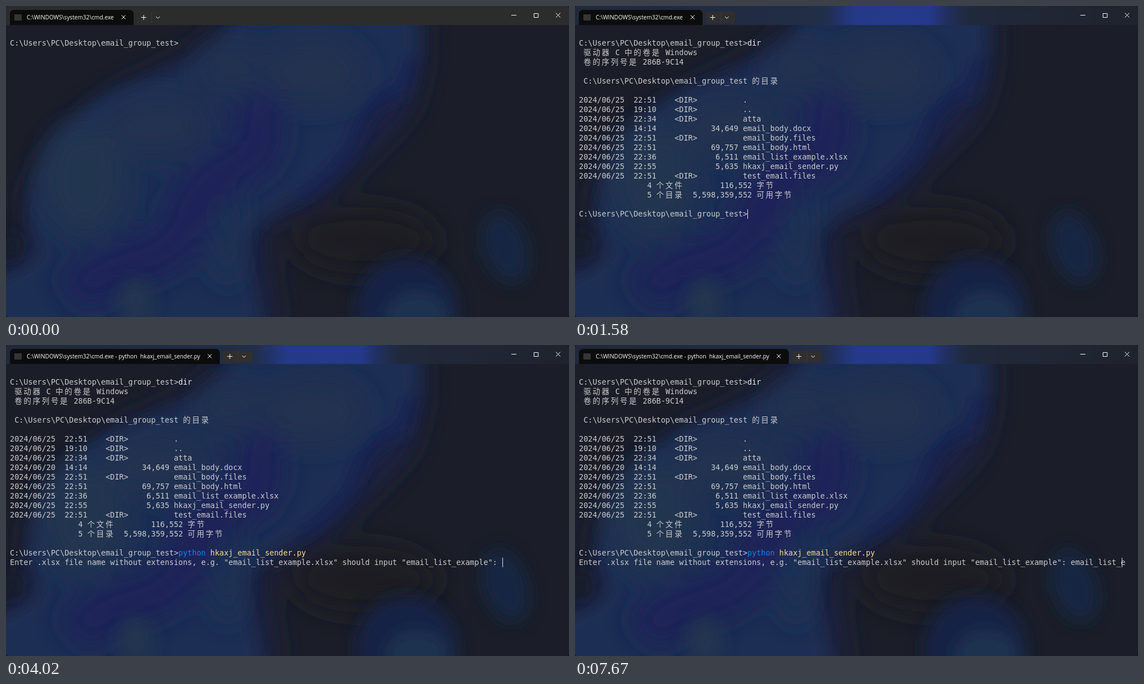
These frames come from a looping animation (1006 px wide and 557 px high, 8 s). An HTML page:

```html
<!DOCTYPE html>
<html lang="zh-CN">
<head>
<meta charset="utf-8">
<title>Terminal</title>
<style>
html, body { margin: 0; width: 100%; height: 100%; overflow: hidden; background: #16181c; }
#win { position: relative; width: 1006px; height: 557px; overflow: hidden; border-radius: 5px; background: #1b1e28; }
#win > * { position: absolute; }
svg { left: 0; top: 0; }
#bar, #glass { left: 0; top: 0; width: 1006px; height: 34px; background: #2c2c2c; }
#glass { background: linear-gradient(90deg, #20283a 0, #212e47 44%, #22336a 47%, #243a88 50%, #25398a 63%, #212f5f 66%, #20293b 70%, #1f232d 100%); }
#tab { left: 7px; top: 7px; height: 27px; background: #0c0c0c; border-radius: 7px 7px 0 0; }
#name { left: 37px; top: 13px; font: 500 10.2px/15px "Open Sans", "Noto Sans", sans-serif; color: #fff; white-space: pre; }
pre, #caret { top: 57.5px; line-height: 17px; }
pre { left: 7px; margin: 0; color: #ccc; font: 13.5333px/17px "DejaVu Sans Mono", "Noto Sans CJK SC", "Noto Sans CJK", monospace; }
pre i { font-style: normal; letter-spacing: 2.76px; }
.hint { position: absolute; left: 96ch; color: #464b51; }
.hint b { font-weight: 400; color: #0c0c0c; background: #4b4e50; }
.ghost { color: #464b51; }
.bad { color: #f04d5c; }
.ok { color: #f2f2f2; }
.exe { color: #1483ea; }
.arg { color: #fbdc8d; }
#caret { width: 1px; height: 17px; background: #e4e4e4; }
</style>
</head>
<body>
<div id="win">
  <svg width="1006" height="557">
    <defs>
      <filter id="soft" x="-50%" y="-50%" width="200%" height="200%"><feGaussianBlur stdDeviation="14"/></filter>
      <filter id="wide" x="-60%" y="-60%" width="220%" height="220%"><feGaussianBlur stdDeviation="24"/></filter>
    </defs>
    <g filter="url(#wide)">
      <ellipse cx="640" cy="420" rx="130" ry="60" fill="#1a1c24"/>
      <path d="M400 0H745Q760 120 720 200Q650 270 600 320Q530 370 460 400L490 580H-30V470Q60 430 30 350Q70 210 230 130Q360 80 400 0Z" fill="#1a2042"/>
    </g>
    <g filter="url(#soft)">
      <path d="M415 0H730Q748 90 715 160Q640 185 632 225Q600 300 520 345Q432 385 427 435Q440 500 462 590H-30V495Q40 465 60 440Q30 390 48 340Q75 220 180 160Q280 125 355 90Q400 60 415 0Z" fill="#1d2d53"/>
      <path d="M725 90Q715 155 660 170Q630 205 620 245Q580 310 520 340" fill="none" stroke="#192453" stroke-width="22"/>
    </g>
    <g filter="url(#wide)">
      <ellipse cx="140" cy="310" rx="75" ry="100" fill="#22344f"/>
      <ellipse cx="270" cy="215" rx="90" ry="55" fill="#20314f"/>
      <ellipse cx="550" cy="120" rx="95" ry="60" fill="#22334f"/>
      <ellipse cx="400" cy="110" rx="60" ry="40" fill="#213250"/>
      <ellipse cx="395" cy="400" rx="22" ry="100" fill="#1f3053"/>
      <path d="M435 165Q475 220 440 270Q350 310 325 370Q320 435 240 455Q170 470 120 520" fill="none" stroke="#1b2459" stroke-width="84"/>
    </g>
    <g filter="url(#soft)">
      <ellipse cx="10" cy="430" rx="17" ry="28" fill="#191e29"/>
      <ellipse cx="232" cy="530" rx="32" ry="42" fill="#22344f"/>
      <ellipse cx="715" cy="545" rx="92" ry="95" fill="#192445"/>
      <ellipse cx="735" cy="555" rx="58" ry="45" fill="#1f314f"/>
      <ellipse cx="892" cy="432" rx="40" ry="66" fill="#182542" transform="rotate(-18 892 432)"/>
    </g>
  </svg>

  <div id="bar"></div>
  <div id="glass"></div>
  <div id="tab"></div>
  <div id="name"></div>
  <svg width="1006" height="557" fill="none" stroke="#fff">
    <rect x="15" y="15" width="13" height="11" fill="#353535" stroke="none"/>
    <g id="tools">
      <path d="M206.5 16.5l7 7m0-7l-7 7"/>
      <rect id="plate" x="233" y="10" width="53" height="21" rx="3" fill="#302e2e" stroke="none"/>
      <path d="M260.5 11v19" stroke="#3b3b3b"/>
      <path d="M241.5 20.5h9m-4.500-4.500v9M268 19l3.300 3.300 3.300-3.300"/>
    </g>
    <path d="M903 16.500h9M943.500 13.500h7.500v7h-7.500zM982.500 12.500l8 8m0-8l-8 8"/>
  </svg>

  <pre id="text"></pre>
  <div id="caret"></div>
  <svg id="mouse" width="14" height="18"><path d="M.5.5V11.500L3 9.200 4.700 13 6.500 12.200 4.900 8.500H8.200Z" fill="#fff" stroke="#111" stroke-width=".7"/></svg>
</div>

<script>
const LOOP = 8000, CELL = 8.148, LINE = 17;
const $ = id => document.getElementById(id);
const span = (cls, s) => `<span class="${cls}">${s}</span>`;
const count = (t, times) => times.filter(x => t >= x).length;

const path = "C:\\Users\\PC\\Desktop\\email_group_test";
const prompt = path + "&gt;";
const promptCols = path.length + 1;
const hint = span("hint", "<b>Right</b>=Accept Suggestion");
const script = "hkaxj_email_sender.py";
const question = 'Enter .xlsx file name without extensions, e.g. "email_list_example.xlsx" should input "email_list_example": ';
const answer = "email_list_example";

// day, time, size (0 = directory), name
const files = [
  [25, "22:51", 0, "."],
  [25, "19:10", 0, ".."],
  [25, "22:34", 0, "atta"],
  [20, "14:14", "34,649", "email_body.docx"],
  [25, "22:51", 0, "email_body.files"],
  [25, "22:51", "69,757", "email_body.html"],
  [25, "22:36", "6,511", "email_list_example.xlsx"],
  [25, "22:55", "5,635", script],
  [25, "22:51", 0, "test_email.files"]
].map(([day, time, size, name]) =>
  `2024/06/${day}  ${time}    ` + (size ? size.padStart(14) : "&lt;DIR&gt;".padEnd(20)) + " " + name);

const listing = [
  " 驱动器 C 中的卷是 Windows",
  " 卷的序列号是 286B-9C14",
  "",
  ` ${path} 的目录`,
  "",
  ...files,
  " ".repeat(15) + "4 个文件        116,552 字节",
  " ".repeat(15) + "5 个目录  5,598,359,552 可用字节",
  ""
].join("\n").replace(/[\u4e00-\u9fff]+/g, "<i>$&</i>");

const dirKeys = [1210, 1300, 1400];
const pyKeys = [2250, 2335, 2420];
const answerKeys = [4850, 4955, 5060, 5165, 5270, 5700, 6970, 6970, 7130, 7380, 7590, 7670];
const caretOff = [[0, 740], [2100, 2250], [3780, 4020], [4360, 4850], [6370, 6970]];
const mousePath = [[609, 455], [604, 370], [593, 240], [582, 140], [588, 111]];

// Half-typed command followed by its suggestion
const partial = (cmd, n) => n ? span("bad", cmd.slice(0, n)) + span("ghost", cmd.slice(n)) + hint : "";

function screen(t) {
  const d = count(t, dirKeys);
  let html = prompt + (d < 3 ? partial("dir", d) : span("ok", "dir"));
  if (t < 1490) return [html, promptCols + d, 0];
  if (t < 1580) return [html, 0, 1];

  const p = count(t, pyKeys);
  html += "\n" + listing + "\n" + prompt;
  if (t < 3080) return [html + partial("python " + script, p), promptCols + p, 18];

  html += span("exe", "python") + " " + span("arg", script);
  if (t < 3175) return [html, promptCols + 7 + script.length, 18];
  if (t < 4020) return [html, 0, 19];

  const n = count(t, answerKeys);
  return [html + "\n" + question + answer.slice(0, n), question.length + Math.min(n, 11), 19];
}

let shown;
function draw(t) {
  const [html, col, row] = screen(t);
  if (html !== shown) $("text").innerHTML = shown = html;
  $("caret").style.left = 7 + col * CELL + "px";
  $("caret").style.top = 57.5 + row * LINE + "px";
  $("caret").hidden = caretOff.some(([a, b]) => t >= a && t < b);

  const running = t >= 3270;
  $("name").textContent = "C:\\WINDOWS\\system32\\cmd.exe" + (running ? " - python  " + script : "");
  $("tab").style.width = (running ? 375 : 221) + "px";
  $("tools").setAttribute("transform", `translate(${running ? 154 : 0})`);
  $("glass").style.opacity = t < 740 ? 0 : t < 840 ? 0.85 : 1;
  $("plate").style.opacity = t < 740 ? 0 : 1;

  const step = count(t, [120, 215, 310, 405, 500]);
  const [x, y] = mousePath[Math.max(0, step - 1)];
  const mouse = $("mouse").style;
  mouse.display = step && t < 1210 ? "block" : "none";
  mouse.left = x + "px";
  mouse.top = y + "px";
}

const start = performance.now();
function tick() {
  draw((performance.now() - start) % LOOP);
  requestAnimationFrame(tick);
}
tick();
</script>
</body>
</html>
```
